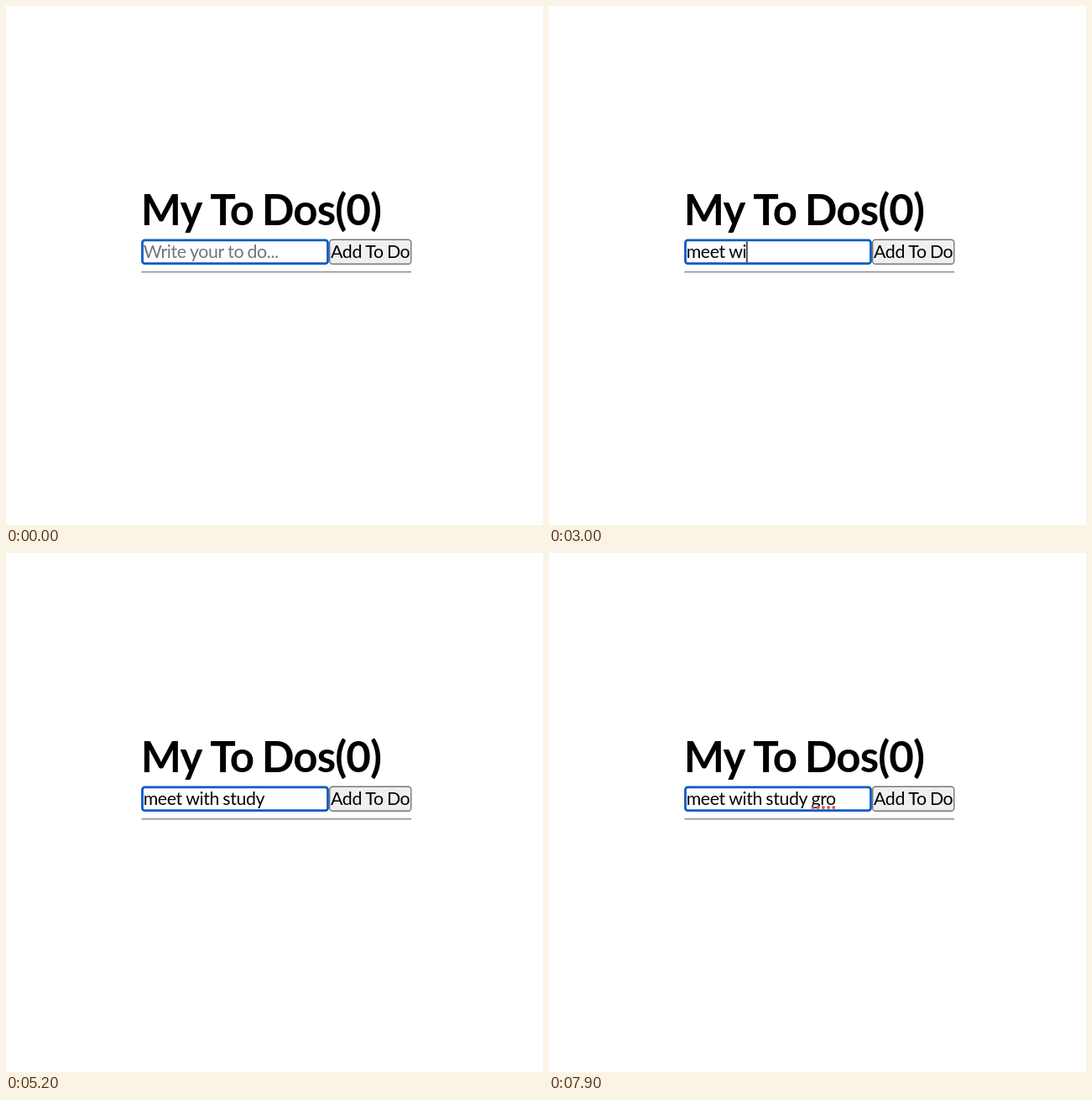
An HTML page with a canvas that plays this animation: 640 px wide and 618 px high, repeating every 8000 ms.

```html
<!DOCTYPE html>
<html lang="en">
<head>
<meta charset="utf-8">
<title>My To Dos</title>
<style>
  html, body { margin: 0; width: 100%; height: 100%; overflow: hidden; background: #fff; }
  canvas { display: block; }
</style>
</head>
<body>
<canvas width="640" height="618"></canvas>
<script>
const ctx = document.querySelector('canvas').getContext('2d');
const LOOP = 8000, TICK = 100, BLINK = 500;
const SPELLCHECK_AT = 7400;
const TEXT_X = 163.7, BASELINE = 300, TEXT_SIZE = 21.33;

// Bursts of typing; "lit" is how long the caret stays on after the last key.
const BURSTS = [
  { at: 100, keys: '', lit: BLINK },
  { at: 1200, keys: 'mee', pace: 150 },
  { at: 2000, keys: 't ', pace: 200 },
  { at: 3000, keys: 'wi', pace: 0 },
  { at: 3200, keys: 'th', pace: 100 },
  { at: 3500, keys: ' st', pace: 200, lit: 200 },
  { at: 4800, keys: 'udy', pace: 100, lit: 200 },
  { at: 5600, keys: ' ', lit: 400 },
  { at: 6300, keys: 'gro', pace: 200, lit: 200 }
];

function inputAt(t) {
  let typed = '', caret = false;
  for (const { at, keys, pace = 0, lit = Infinity } of BURSTS) {
    if (t < at) break;
    typed += [...keys].filter((_, i) => t >= Math.floor((at + i * pace) / TICK) * TICK).join('');
    const idle = t - at - Math.max(0, keys.length - 1) * pace - lit;
    caret = idle < 0 || idle % (2 * BLINK) >= BLINK;
  }
  return { typed, caret };
}

function text(str, x, y, size, color, weight = 400) {
  ctx.font = `${weight} ${size}px Lato, sans-serif`;
  ctx.letterSpacing = `${-0.018 * size}px`;
  ctx.wordSpacing = `${-0.035 * size}px`;
  ctx.fillStyle = color;
  ctx.fillText(str, x, y);
  return ctx.measureText(str).width;
}

function box(x, y, w, h, radius, line, stroke, fill) {
  ctx.beginPath();
  ctx.roundRect(x + line / 2, y + line / 2, w - line, h - line, radius);
  ctx.fillStyle = fill;
  ctx.fill();
  ctx.lineWidth = line;
  ctx.strokeStyle = stroke;
  ctx.stroke();
}

function rect(x, y, w, h, color) {
  ctx.fillStyle = color;
  ctx.fillRect(x, y, w, h);
}

function drawPage() {
  rect(0, 0, 640, 618, '#fff');
  text('My To Dos(0)', 160.8, 261, 51, '#000', 700);
  box(385, 277.5, 98.5, 30.5, 3.5, 1.4, '#767676', '#efefef');
  text('Add To Do', 387, BASELINE, TEXT_SIZE, '#000');
  box(161.1, 277.4, 223.8, 30.7, 3, 2.8, '#085bc6', '#fff');
  rect(161.5, 316, 321.5, 1.3, '#858585');
  rect(161.5, 317.3, 321.5, 0.9, '#d0d0d0');
}

function drawMisspelling() {
  ctx.fillStyle = '#e0554d';
  for (let i = 0; i < 5; i++) {
    ctx.beginPath();
    ctx.arc(314.5 + i * 6.2, 303, 2, 0, 2 * Math.PI);
    ctx.fill();
  }
}

function drawInput(t) {
  const { typed, caret } = inputAt(t);
  const width = text(typed, TEXT_X, BASELINE, TEXT_SIZE, '#000');
  if (!typed) text('Write your to do...', TEXT_X, BASELINE, TEXT_SIZE, '#757575');
  if (t >= SPELLCHECK_AT) drawMisspelling();
  if (caret) rect(TEXT_X + width, 280.5, 1.3, 25, '#000');
}

function frame() {
  drawPage();
  drawInput(performance.now() % LOOP);
  requestAnimationFrame(frame);
}
requestAnimationFrame(frame);
</script>
</body>
</html>
```
